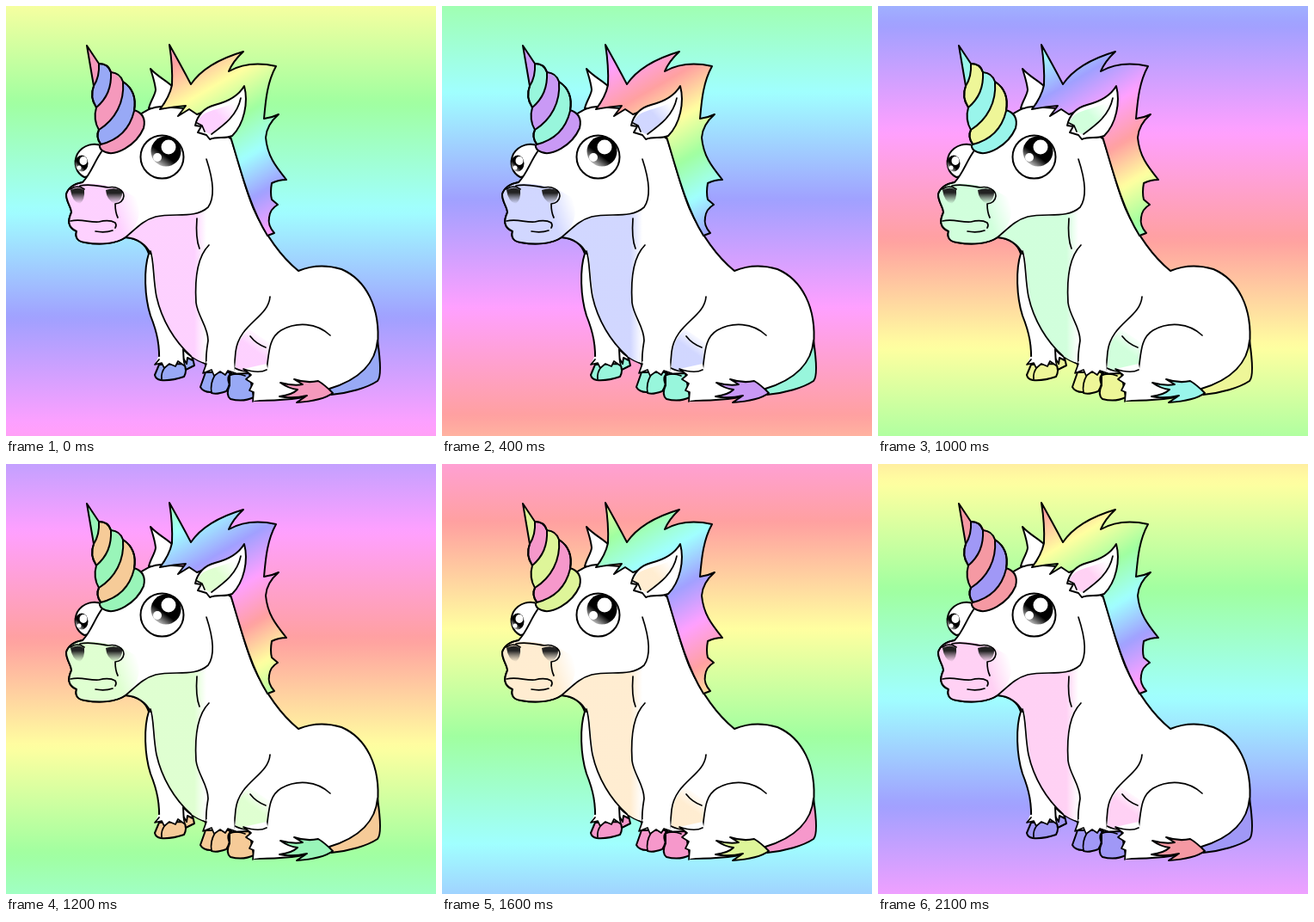
Recreate the animation shown at these times as an HTML page. Size 500 px wide and 500 px high, loop 2.2 s.

```html
<!DOCTYPE html>
<html lang="en">
<head>
<meta charset="utf-8">
<title>Rainbow unicorn</title>
<style>
html, body { margin: 0; width: 100%; height: 100%; overflow: hidden; }
svg { display: block; width: 100vw; height: 100vh; }
.ink { fill: none; stroke: #000; stroke-width: 1.7; stroke-linecap: round; stroke-linejoin: round; }
.shape { stroke: #000; stroke-width: 2; stroke-linejoin: round; }
.white { fill: #fff; }
.a { fill: var(--a); }
.b { fill: var(--b); }
.pale-stop { stop-color: var(--pale); }
</style>
</head>
<body>
<svg id="stage" viewBox="0 0 500 500">
  <defs>
    <linearGradient id="sky" gradientUnits="userSpaceOnUse" x1="0" y1="0" x2="0" y2="500"></linearGradient>
    <linearGradient id="maneFill" gradientUnits="userSpaceOnUse" x1="69" y1="120" x2="194" y2="337.5"></linearGradient>
    <linearGradient id="muzzle" gradientUnits="userSpaceOnUse" x1="118" y1="245" x2="155" y2="232">
      <stop offset="0.25" class="pale-stop"/><stop offset="1" stop-color="#fff"/>
    </linearGradient>
    <linearGradient id="chest" gradientUnits="userSpaceOnUse" x1="219" y1="0" x2="233" y2="0">
      <stop offset="0" class="pale-stop"/><stop offset="1" stop-color="#fff"/>
    </linearGradient>
    <linearGradient id="earFill" gradientUnits="userSpaceOnUse" x1="232" y1="145" x2="266" y2="114">
      <stop offset="0" class="pale-stop"/><stop offset="0.5" class="pale-stop"/><stop offset="1" stop-color="#fff"/>
    </linearGradient>
    <linearGradient id="belly" gradientUnits="userSpaceOnUse" x1="282" y1="405" x2="298" y2="383">
      <stop offset="0.3" class="pale-stop"/><stop offset="1" stop-color="#fff"/>
    </linearGradient>
    <linearGradient id="nostril" x1="0" y1="0" x2="0" y2="1">
      <stop offset="0.3" stop-color="#222"/><stop offset="1" stop-color="#555" stop-opacity="0"/>
    </linearGradient>
    <linearGradient id="iris" x1="0.65" y1="0.3" x2="0.2" y2="0.9">
      <stop offset="0.5" stop-color="#000"/><stop offset="1" stop-color="#bbb"/>
    </linearGradient>
  </defs>

  <rect width="500" height="500" fill="url(#sky)"/>

  <!-- far ear, far eye, far hoof -->
  <path class="shape white" d="M166 119C168 110 174 103 174 97C173 88 170 80 168 73C177 83 188 87 196 96L196 122Z"/>
  <path class="shape white" d="M114 164C103 157 89 162 83 172C78 182 81 194 91 199L101 197Z"/>
  <ellipse cx="88" cy="183" rx="7.5" ry="9.5" fill="url(#iris)"/>
  <ellipse cx="90" cy="180" rx="4.5" ry="5" fill="#fff"/>
  <circle cx="85" cy="188" r="2.5" fill="#fff"/>
  <path class="shape b" d="M204 402L216 405L219 418L207 424Z"/>
  <path class="shape white" d="M203 394L216 406L217 412L211 409L210 416L205 408Z"/>

  <!-- body -->
  <path class="shape white" d="M112 168C103 180 99 195 89 205C78 207 72 212 70 219C70 228 76 234 76 240C72 249 71 257 82 262C80 269 83 274 92 275C108 278 128 277 139 269C152 270 162 276 166 288C160 306 161 338 168 360C176 380 179 395 178 418L207 418L206 399C213 407 222 412 232 416L232 430L262 430L286 429L289 459C323 459 349 456 375 450C407 441 430 418 432 395C436 350 418 318 390 306C370 300 352 303 340 308C318 290 300 262 288 236C277 210 272 185 262 155L222 120L180 117C171 117 164 121 156 126Z"/>

  <!-- chest and belly -->
  <path fill="url(#chest)" d="M140 269C153 257 160 249 174 245C195 241 216 247 235 237C238 252 241 266 236 279C224 290 219 312 221 345C223 362 233 375 233 387L232 415C210 409 190 384 181 358C174 336 173 312 171 290C163 275 150 270 140 269Z"/>
  <path class="shape" fill="none" stroke-linecap="round" d="M139 269C152 270 163 277 168 288"/>
  <path class="ink" d="M168 285C172 295 171 318 175 338C181 365 196 390 215 407"/>
  <path fill="#fff" d="M236 278C224 290 219 312 221 345C223 362 235 374 235 390L232 430H264L267 400C273 375 306 365 308 338L270 230Z"/>
  <path d="M267 421C266 397 272 384 283 376L307 392Q303 407 304 421L283 428Z" fill="url(#belly)"/>
  <path class="ink" d="M236 278C224 290 219 312 221 345C223 361 235 373 235 389Q232 407 233 416M307 338C305 363 271 369 267 402L265 424M284 384Q291 393 302 397M222 247C221 260 221 272 225 282M266 421Q284 430 303 420M303 423C306 404 305 386 320 377C338 367 361 368 377 383"/>

  <!-- head details -->
  <path d="M76 210C92 203 112 208 132 212L150 222C160 240 153 258 139 268C128 277 104 277 91 275Q81 273 82 262C71 258 72 249 76 240C75 232 70 225 70 219Z" fill="url(#muzzle)"/>
  <path class="shape" fill="none" d="M89 205C78 207 72 212 70 219C70 228 76 234 76 240C72 249 71 257 82 262C80 269 83 274 92 275C108 278 128 277 139 269"/>
  <path d="M75 214Q84 209 91 214Q92 225 86 230Q77 228 75 214Z" fill="url(#nostril)"/>
  <path d="M116 214Q127 210 135 215Q136 225 127 230Q117 226 116 214Z" fill="url(#nostril)"/>
  <path class="ink" d="M75 213Q83 207 91 213M86 209C99 206 109 210 119 211C128 209 137 214 137 221Q136 229 127 230Q127 240 130 246M75 250C88 247 96 252 108 251Q120 248 127 252Q129 255 127 258M104 262Q115 264 124 261M139 269C153 257 160 249 174 245C196 240 219 248 235 234C245 220 239 196 233 178"/>
  <circle class="shape white" cx="181.5" cy="175.5" r="25"/>
  <circle cx="186" cy="169" r="17.5" fill="url(#iris)"/>
  <circle cx="189" cy="164" r="8.5" fill="#fff"/>
  <circle cx="176" cy="176" r="5" fill="#fff"/>

  <!-- mane and near ear -->
  <path class="shape" fill="url(#maneFill)" d="M179 120Q190 106 193 92Q194 70 190 45Q204 70 215 91Q232 66 276 53Q264 64 259 76Q282 63 314 70C304 88 302 108 300 131Q309 130 317 126Q303 138 302 153C304 175 314 187 326 202Q317 202 309 206Q307 217 309 225L316 231Q307 236 306 246Q304 255 312 264L304 267C285 236 275 199 262 155L244 118L222 126L213 120L200 128L209 116Q196 117 179 120Z"/>
  <path class="shape white" d="M277 93C282 112 277 137 263 151C254 155 246 151 237 155L233 150L223 147L227 140L220 139C223 125 232 118 243 115C259 111 270 105 277 93Z"/>
  <path d="M272 108C269 127 254 138 237 149L229 145L228 139L222 136C228 118 254 122 272 108Z" fill="url(#earFill)"/>
  <path class="ink" d="M273 107C269 127 254 138 239 149M231 146L228 139L222 136"/>

  <!-- horn -->
  <path class="a" d="M94 46L108 67L122 74L136 87Q151 98 149 121Q164 126 160 142C152 161 126 178 112 168Q106 162 109 157Q105 150 108 143Q101 132 105 117Q98 106 102 93Z"/>
  <path class="shape b" d="M108 67Q119 67 122 77C123 94 117 108 105 118Q97 106 102 93Q109 82 108 67Z"/>
  <path class="shape b" d="M136 88Q153 99 149 122C144 143 130 156 110 161Q104 152 108 144C127 132 138 112 136 88Z"/>
  <path class="shape" fill="none" d="M94 46L108 67Q119 67 122 77Q133 78 136 88Q153 99 149 121Q164 126 160 142C152 161 126 178 112 168Q107 164 110 160Q104 152 108 144Q101 132 105 118Q97 106 102 93Z"/>

  <!-- hooves -->
  <path class="shape b" d="M178 417L207 416Q211 424 207 431Q193 436 180 435Q174 434 173 429Z"/>
  <path class="ink" d="M185 420Q180 426 181 434"/>
  <path class="white" d="M177 408L173 417L181 415L184 421L190 416L197 419L200 414L207 417L203 405Z"/>
  <path class="ink" d="M178 411L173 417L181 415L184 421L190 416L197 419L200 413L207 418"/>
  <path class="shape b" d="M232 426L262 426Q261 441 256 448Q242 453 238 449Q229 449 226 443Z"/>
  <path class="ink" d="M243 429Q237 439 239 450"/>
  <path class="white" d="M233 413L230 427L239 423L242 430L249 425L255 429L258 424L266 427L265 411Z"/>
  <path class="ink" d="M233 416L229 427L239 423L242 430L249 425L255 429L258 424L267 427"/>
  <path class="shape b" d="M260 428L283 427L288 455Q276 461 261 457Q255 452 260 441Z"/>
  <path class="ink" d="M260 441Q257 434 259 430Q268 426 278 430"/>
  <path class="white" d="M303 416L276 422L285 429L279 434L287 439L283 447L288 449L288 459L311 456Z"/>
  <path class="ink" d="M303 423Q294 428 276 422L285 429L279 434L287 439L283 447L288 449L287 460"/>

  <!-- tail -->
  <path class="white" d="M430 385C431 414 412 435 376 446L340 440Z"/>
  <path class="shape b" d="M432 389C430 414 412 434 376 445L378 452C399 450 420 444 432 436Q438 430 432 389Z"/>
  <path class="shape a" d="M380 450Q368 459 338 461L350 453Q333 457 318 454Q333 452 339 446Q329 445 319 438Q334 442 345 440L335 434Q350 439 363 436Q370 440 380 450Z"/>
</svg>
<script>
const STEPS = 22, STEP_MS = 100, STOPS = 60;
const stage = document.getElementById('stage');
const pastel = (hue, light = 81.4, sat = 100) => `hsl(${((hue % 360) + 360) % 360}, ${sat}%, ${light}%)`;

function addStops(id) {
  const gradient = document.getElementById(id);
  return Array.from({ length: STOPS + 1 }, (_, i) => {
    const stop = document.createElementNS('http://www.w3.org/2000/svg', 'stop');
    stop.setAttribute('offset', i / STOPS);
    return gradient.appendChild(stop);
  });
}

function paint(stops, from, span) {
  stops.forEach((stop, i) => stop.setAttribute('stop-color', pastel(from + span * i / STOPS)));
}

const sky = addStops('sky');
const mane = addStops('maneFill');
let shown = -1;

// The sky turns forwards through the hues, the unicorn backwards.
function draw(time) {
  const step = Math.floor(time / STEP_MS) % STEPS;
  if (step !== shown) {
    shown = step;
    const turn = step * 360 / STEPS;
    paint(sky, 66 + turn, 240);
    paint(mane, -23 - turn, 333);
    stage.style.setProperty('--a', pastel(337 - turn, 78, 82));
    stage.style.setProperty('--b', pastel(229 - turn, 78, 84));
    stage.style.setProperty('--pale', pastel(298 - turn, 91));
  }
  requestAnimationFrame(tick);
}

const start = performance.now();
const tick = () => draw(performance.now() - start);
tick();
</script>
</body>
</html>
```
